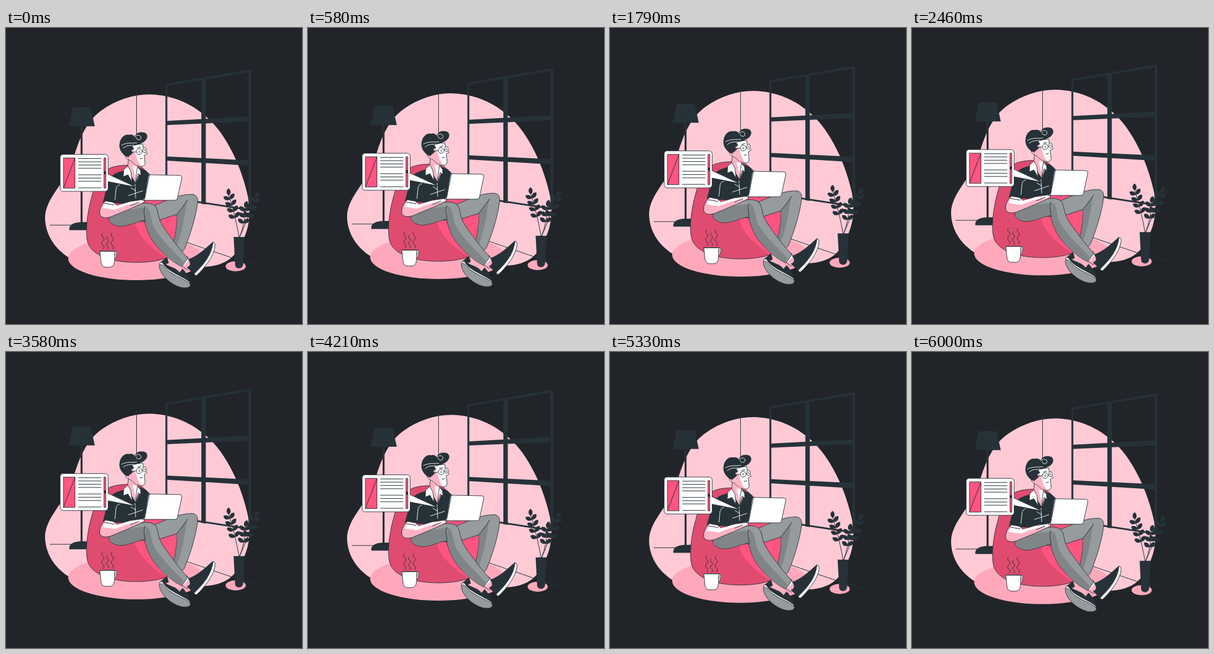
An HTML page for the animation above (6.04 s loop, 500 by 500 pixels).

```html
<!DOCTYPE html>
<html lang="en">
<head>
<meta charset="utf-8">
<title>Reading at home</title>
<style>
html,body{margin:0;width:100%;height:100%;overflow:hidden;background:#212529}
svg{display:block;width:100vw;height:100vh}
.ink{fill:#263238}
.line{fill:none;stroke:#263238;stroke-width:1}
.edge{stroke:#263238;stroke-width:.9;stroke-linejoin:round}
.white{fill:#fff}
.blush{fill:#ffb3c5}
.rug{fill:#ffa8bc}
.hot{fill:#ff5580}
.bag{fill:#df4c70}
.cloth{fill:#969b9d}
.fold{fill:#808587}
.glint{fill:none;stroke:#fff;stroke-width:.9;stroke-linecap:round}
</style>
</head>
<body>
<svg viewBox="0 0 500 500" xmlns="http://www.w3.org/2000/svg">
<g id="scene">
  <path fill="#ffcad6" d="M243 112.3C281 113 314 128 339 150.5C372 179 399 235 410 291C415 329 405 356 387 381C373 400 346 406 309 403C230 416 143 410 105 387C80 371 66 346 66 320C67 286 100 264 114 220C123 189 136 156 163 138C186 122 214 112 243 112.3Z"/>
  <ellipse cx="220" cy="389" rx="115" ry="37" class="rug"/>
  <path class="line" d="M220.5 105V184M74 333H140M305 362L384 389L432 402.5"/>

  <!-- window -->
  <g class="ink">
    <path fill-rule="evenodd" d="M269.3 94.5L414 70V309L269.3 287ZM272.5 97.5V284.5L409.5 305.5V74.5Z"/>
    <path d="M330 86L337.5 85V298L330 297ZM271 157L411 149.5V158L271 164ZM271 217L411 223.5V232.5L271 224Z"/>
  </g>

  <!-- lamp -->
  <path class="ink" d="M113 134H143L150 166H106ZM126 166H129.3V328H137L143 341.5H107C106 333 112 329 126 328Z"/>

  <!-- plant -->
  <ellipse cx="388" cy="402.5" rx="17" ry="8.5" class="rug"/>
  <g id="plant" class="ink"></g>
  <path class="ink" d="M384.5 353H403L400.5 400Q399 406 393 406Q387 405 387 400Z"/>

  <!-- bean bag -->
  <path class="bag edge" d="M177 236C166 240 150 262 145 285C138 308 133 344 138 362C145 385 180 396 220 396C253 396 278 389 291 377L302 300L230 236C215 230 190 231 177 236Z"/>
  <path class="hot" d="M217 326C221 350 246 373 271 388.5L290 378L300 292H235Z"/>

  <!-- neck and shirt -->
  <path class="ink edge" d="M201 241L224 237C235 239 240 243 241.5 250L235 291L218 297L164 295C168 281 171 262 179 250Q186 244 201 241Z"/>
  <path class="blush edge" d="M207 219H222V237L226 245L219.5 263L205 240Z"/>
  <path class="white" d="M214 233L222 234V238L219 255Z"/>
  <path class="white edge" d="M206 233L199 239L198 251L206 248L213 260L211 243ZM222 235L227 240L228 249L223 246L219 263L220 247Z"/>
  <path class="glint" d="M192 265Q188 265 186 271L184 290M218 264L219 287M207 283L231 275M211 270L219 275"/>

  <!-- far leg -->
  <path class="cloth edge" d="M248 301C270 292 292 281 312 281C321 280 325 286 323.5 296C321 317 312 348 301 374L296 379L283 363C287 344 290 330 288 315L257 325Z"/>
  <path class="fold" d="M306 291C302 315 299 340 289 367L284 362C288 344 290 330 288 315C292 309 299 301 306 291Z"/>
  <path class="line" d="M307 290C298 304 291 311 288 316"/>

  <!-- far shoe -->
  <path class="ink edge" d="M260 397L272 387L285 396L300 409C306 416 310 424 311 432L285 428Z"/>
  <path class="blush" d="M272 386L281 381L298 407L293 413C288 405 278 404 270 399L275 397Z"/>
  <path class="white edge" d="M259 401Q259 395 264 396C272 412 299 419 310 429L311 434Z"/>
  <path class="cloth edge" d="M259 403C260 396 265 400 271 407C282 419 305 424 311.5 433C312 439 303 440 295 438C278 433 261 418 259 403Z"/>

  <!-- near leg and shoe -->
  <path class="ink" d="M215 328L238 315V326Z"/>
  <path class="blush edge" d="M297 391L306 386L315 400L306 408L297 402Z"/>
  <path class="white" d="M297 394L306 388L309 392L299 402Z"/>
  <path class="ink edge" d="M308 391C321 387 335 375 349 362Q353 362 352.5 369C350 386 334 405 320 418L306 404C312 403 313 397 308 391Z"/>
  <path class="white edge" d="M349.5 362Q354 362 353 370C350 387 335 406 322 418Q319 419 318 415C336 398 348 381 349.5 362Z"/>
  <path class="cloth edge" d="M174 321C178 314 195 304 215 299C231 295 246 294 252 301C257 307 256 315 260 325C266 339 280 355 290 369L307 389L297 403C282 396 266 383 251 364C240 350 238 337 233 325C222 327 205 335 192 335C180 333 173 328 174 321Z"/>
  <path class="fold" d="M175 321C180 314 200 307 236 303C232 311 235 318 235 324C222 326 205 334 192 334C181 332 174 327 175 321ZM236 303C244 304 244 318 248 332C257 354 284 377 300 395L297 402C280 395 264 381 251 363C240 349 239 337 234 325Z"/>
  <path class="line" d="M235 302C231 309 235 319 235 328"/>

  <!-- arm and laptop -->
  <path class="blush edge" d="M168 292C162 297 157 307 158.5 315C161 322 171 321 177 319L211 305L233 295Q236 291 229 290L209 293L188 300L182 295Z"/>
  <path class="white" d="M168 293L181 295L187 300L209 294L231 291Q235 293 230 295L205 299L184 307L163 304Z"/>
  <path class="line" d="M166 296L183 299M210 300L225 294"/>
  <path class="white edge" d="M244 248L294 249Q297.5 249.5 297 253L289.5 288Q289 291 285 291H231L234 287L240 251Q241 248 244 248Z"/>
  <path class="line" d="M242 249L234 290"/>

  <!-- head -->
  <path class="white edge" d="M209 203L214 197L231 196L232 204L238.5 212L233.5 215L235 228Q235 233 229 234Q217 232 212 225L207 222C200 220 200 213 206 211Z"/>
  <path class="blush" d="M207 211C201 213 202 220 208 221L213 225Q219 233 228 233C222 225 221 219 219 213L215 205Z"/>
  <path class="ink edge" d="M203 217C196 212 190 204 192.5 194C194 185 201 179 208 181Q213 179 218 184C219 176 230 175 236 178C241 183 237 191 229 194C222 198 217 197 213 200L216 204L211 207L214 211L207 217Z"/>
  <path class="glint" d="M195 198C203 193 213 195 221 194M198 203C204 197 211 199 216 198M218 184C221 179 229 181 228 186C227 191 219 189 220 185"/>
  <circle cx="225" cy="208.8" r="4.8" class="white edge"/>
  <ellipse cx="234" cy="206.5" rx="2.8" ry="4.3" class="white edge"/>
  <path class="line" d="M213 210L220 209M230 208H231M222 203L228 201M225 207V211M234 205V208M226 221L231 220M206 214Q203 216 207 219"/>

  <!-- speech screen -->
  <rect x="91.5" y="213.5" width="81" height="62.5" rx="5" class="white edge"/>
  <rect x="97" y="219.5" width="19.5" height="51" class="hot edge"/>
  <path class="line" d="M116.5 219.5L97 270.5"/>
  <rect x="165.5" y="219.5" width="3.2" height="51" class="hot edge"/>
  <path id="copy" class="line"/>
  <path class="white edge" d="M172.5 247L219 268.5L172.5 259.5Z"/>
  <path class="white" d="M170 247.5H173.5V259H170Z"/>
  <path class="ink" d="M165 242H169V247H165Z"/>

  <!-- mug -->
  <path class="white edge" d="M182 378Q188 376 187 382Q186 391 181 392V389Q185 387 184 380Z"/>
  <path class="white edge" d="M158.5 377L160.5 397Q162 404 168 404H176Q182 403 183 396L184 377Z"/>
  <path class="line" d="M158.5 377H184"/>
  <g id="steam" class="line"></g>
</g>
</svg>
<script>
const LOOP = 6040, LIFT = 10;
const byId = id => document.getElementById(id);
const range = n => Array.from({length: n}, (_, i) => i);

// Two paragraphs and a closing line, separated by a blank row.
byId('copy').setAttribute('d', range(10)
  .filter(row => row % 4 || row === 0)
  .map(row => `M122 ${220.5 + row * 5.5}H161`).join(''));

byId('steam').innerHTML = range(3).map(i => {
  const top = i === 1 ? 352 : 346, step = (374 - top) / 4;
  return `<path d="M${163.5 + i * 8} ${top}q-4 ${step / 2} 0 ${step}${`t0 ${step}`.repeat(3)}"/>`;
}).join('');

const leaf = (x, y, tilt) =>
  `<path transform="translate(${x} ${y}) rotate(${tilt})" d="M0 0C-5-4-4-10 1-12C5-8 4-3 0 0Z"/>`;

// A curved stem with a leaf at the tip and pairs of leaves below it.
function branch(bendX, bendY, tipX, tipY, pairs) {
  const rootX = 394, rootY = 355;
  const mix = (a, b, c, t) => (1 - t) ** 2 * a + 2 * t * (1 - t) * b + t * t * c;
  const lean = Math.atan2(tipX - bendX, bendY - tipY) * 180 / Math.PI;
  const sides = range(pairs).map(i => {
    const t = 0.9 - 0.6 * i / pairs;
    const x = mix(rootX, bendX, tipX, t), y = mix(rootY, bendY, tipY, t);
    return leaf(x, y, lean - 55) + leaf(x, y, lean + 50);
  });
  return `<path class="line" d="M${rootX} ${rootY}Q${bendX} ${bendY} ${tipX} ${tipY}"/>`
    + leaf(tipX, tipY, lean + 12) + sides.join('');
}
byId('plant').innerHTML =
  branch(387, 315, 376.5, 283, 4) + branch(404, 330, 404, 304, 3) + branch(410, 318, 420, 287, 3);

const scene = byId('scene');
const start = performance.now();

function draw(now) {
  const phase = (Math.max(0, now - start) % LOOP) / LOOP;
  const rise = LIFT * (1 - Math.abs(1 - 2 * phase));
  scene.setAttribute('transform', `translate(0 ${-rise})`);
  requestAnimationFrame(draw);
}
draw(start);
</script>
</body>
</html>
```
